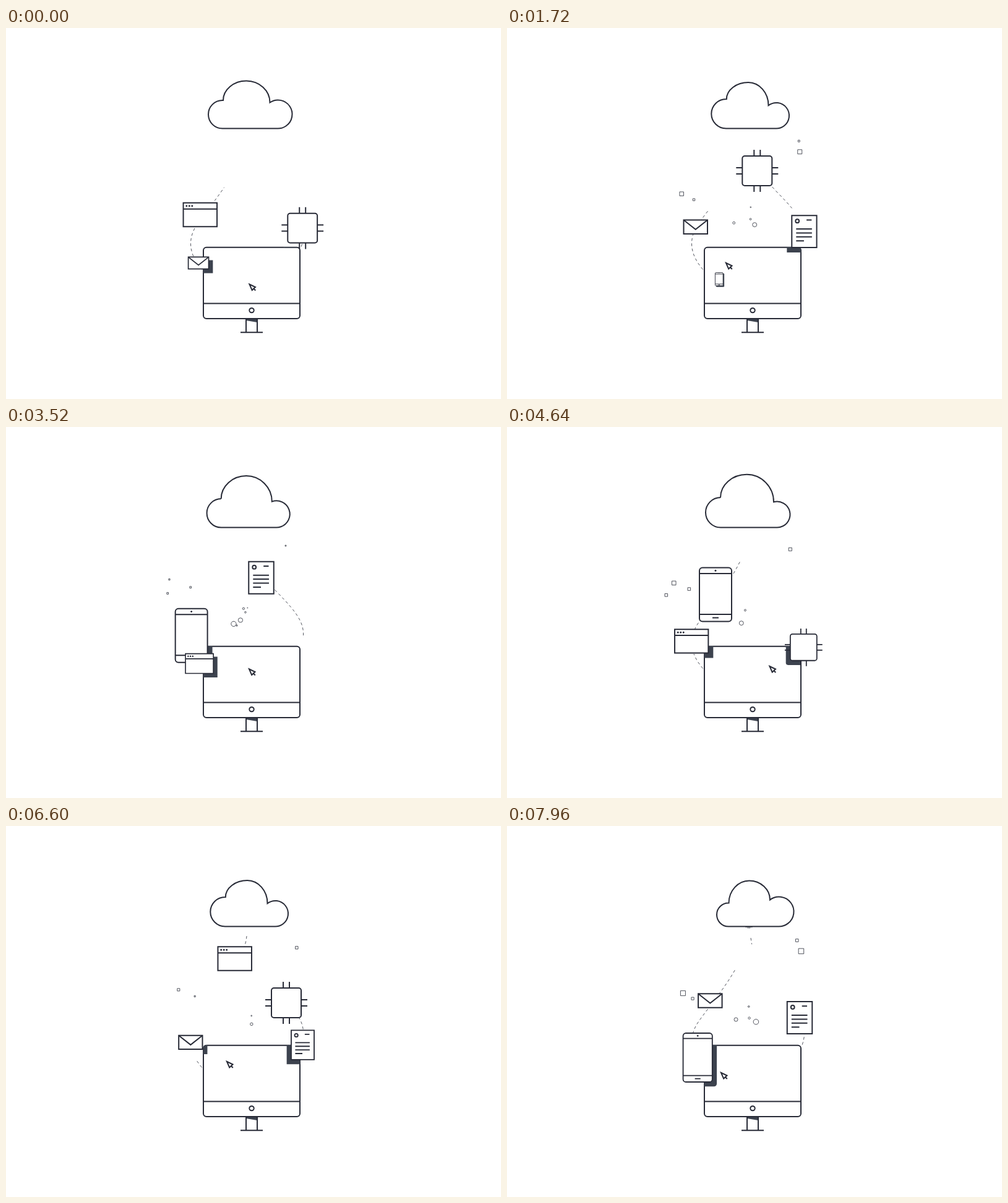
An HTML page with a canvas that plays this animation: 800 px wide and 600 px high, repeating every 8 s.

```html
<!DOCTYPE html>
<html lang="en">
<head>
<meta charset="utf-8">
<title>Cloud upload</title>
<style>
html, body { margin: 0; width: 100%; height: 100%; overflow: hidden; background: #fff; }
canvas { display: block; width: 800px; height: 600px; }
</style>
</head>
<body>
<canvas id="stage"></canvas>
<script>
const LOOP = 8000, CYCLE = 5640;
const INK = '#282b37', SHADE = '#3c424e';
const canvas = document.getElementById('stage');
const ctx = canvas.getContext('2d');
const ratio = window.devicePixelRatio || 1;
canvas.width = 800 * ratio;
canvas.height = 600 * ratio;

const clamp = (v, low = 0, high = 1) => Math.min(high, Math.max(low, v));
const mix = (a, b, u) => a + (b - a) * u;
const progress = (t, from, to) => clamp((t - from) / (to - from));
const smooth = u => u * u * (3 - 2 * u);

// Monotone cubic through [time, x, y] points
function route(points) {
  const last = points.length - 1;
  const slope = (i, c) => (points[i + 1][c] - points[i][c]) / (points[i + 1][0] - points[i][0]);
  const tangent = (i, c) => {
    if (i === 0) return slope(0, c);
    if (i === last) return slope(last - 1, c);
    const a = slope(i - 1, c), b = slope(i, c);
    return a * b <= 0 ? 0 : 2 * a * b / (a + b);
  };
  return time => {
    let i = 0;
    while (i < last - 1 && time > points[i + 1][0]) i++;
    const h = points[i + 1][0] - points[i][0], u = (time - points[i][0]) / h, v = 1 - u;
    return [1, 2].map(c => mix(points[i][c], points[i + 1][c], smooth(u))
      + h * u * v * (v * tangent(i, c) - u * tangent(i + 1, c)));
  };
}

function shape(build, fill = '#fff', line = 2) {
  ctx.beginPath();
  build();
  if (fill) { ctx.fillStyle = fill; ctx.fill(); }
  if (line) { ctx.lineWidth = line; ctx.strokeStyle = INK; ctx.stroke(); }
}
const box = (w, h, r) => ctx.roundRect(-w / 2, -h / 2, w, h, r);
const segment = (x1, y1, x2, y2) => { ctx.moveTo(x1, y1); ctx.lineTo(x2, y2); };
const ring = (x, y, r) => { ctx.moveTo(x + r, y); ctx.arc(x, y, r, 0, 7); };

// Every item on a lane follows the same route; head and tail trim its dashed track
const left = {
  side: 1, life: 3850,
  at: route([[0, 351, 411], [340, 319, 391], [680, 308.2, 374.5], [1600, 298.2, 347], [2350, 306, 318],
    [2650, 315, 300], [3000, 337, 271], [3580, 369.7, 214.5], [3760, 387, 170], [3850, 389, 148]]),
  track: new Path2D('M389 178C384 230 319 299 306 322S297 368 317 391'),
  head: age => mix(391, 178, progress(age, 1400, 3350)),
  tail: age => mix(391, 178, progress(age, 2620, 3900))
};
const right = {
  side: -1, life: 4060,
  at: route([[0, 430, 400], [200, 463, 375], [640, 479.3, 356.3], [1400, 480.5, 331], [2060, 473, 310],
    [2600, 453, 286], [3260, 412.5, 243.7], [3360, 404.3, 231], [3960, 391, 157], [4060, 391, 145]]),
  track: new Path2D('M394 181C397 200 400 228 437 266S489 323 476 357'),
  head: (age, y) => Math.max(y, 180),
  tail: age => mix(357, 180, Math.sqrt(progress(age, 3250, 4060)))
};

function phone(line) {
  shape(() => { segment(-26, -34, 26, -34); segment(-26, 32, 26, 32); segment(-5, 37.5, 5, 37.5); }, null, line);
  shape(() => ring(0, -38.7, 1.5), INK, 0);
}
function browser(line) {
  shape(() => segment(-27, -9.3, 27, -9.3), null, line);
  shape(() => [-22, -17.5, -13].forEach(x => ring(x, -14.2, 1.5)), INK, 0);
}
function mail(line) {
  shape(() => { segment(-19, -11, 0, 4); ctx.lineTo(19, -11); }, null, line);
}
function chip(line) {
  shape(() => [-5, 5].forEach(p => [-1, 1].forEach(s => {
    segment(p, 24 * s, p, 34 * s);
    segment(24 * s, p, 34 * s, p);
  })), null, line);
}
function sheet(line) {
  shape(() => {
    ring(-11.3, -17, 2.9);
    segment(3.7, -18.8, 12, -18.8);
    for (let i = 0; i < 4; i++) segment(-13.2, -4 + 6.4 * i, i < 3 ? 12.5 : -.5, -4 + 6.4 * i);
  }, null, line);
}

const items = [
  { lane: left, start: 1640, size: [52, 87, 5], detail: phone },
  { lane: left, start: 3020, size: [54.5, 38.5, 0], detail: browser },
  { lane: left, start: 5090, size: [38.5, 22.5, 0], detail: mail },
  { lane: right, start: 4000, size: [48, 48, 4], detail: chip },
  { lane: right, start: 260, size: [40.5, 52, 0], detail: sheet }
];

// Grow out of the screen, shrink into the cloud
const scaleAt = (age, y) => Math.max(.01, Math.min(1 - Math.exp(-age / 285), (y - 140) / 65));

// Cloud poses: top x, y, left edge, left notch x, y, right notch x, right edge, right radius
const rest = [388.5, 85.5, 327, 351, 117, 426.5, 462.5, 23];
const calm = [390, 88, 330.3, 354.8, 115, 422.5, 456, 20.8];
const lean = [391.5, 88.5, 339, 358.5, 124.5, 425, 463.5, 24];
const swell = [387.5, 76.8, 321, 345, 114, 431, 457.5, 21];
const cloudSteps = [[0, rest], [960, calm], [1720, calm], [2320, lean], [4000, swell], [4640, swell], [5400, rest], [CYCLE, rest]];

const parked = [393.5, 414.5];
const cursorSteps = [[0, parked], [960, [357, 381]], [1720, [354, 380]], [2320, [346, 399]],
  [3520, [393, 391.5]], [4640, [424.5, 387]], [5400, parked], [CYCLE, parked]];

function pose(steps, time) {
  const i = steps.findIndex(([t]) => t > time);
  const [t0, from] = steps[i - 1], [t1, to] = steps[i];
  const u = smooth(progress(time, t0, t1));
  return from.map((v, c) => mix(v, to[c], u));
}

// Each particle is its last x, y and size
const bursts = [
  { from: 300, to: 2500, squares: [[285, 271, 8.4], [299.5, 279.5, 4.4], [476, 203, 9]],
    bubbles: [[403, 316.3, 9], [391, 311, 3.6]] },
  { from: 1200, to: 3000, squares: [[466, 187, 6]], bubbles: [[373, 311, 8], [388, 294, 3.5]] },
  { from: 2500, to: 3900, squares: [], bubbles: [[370, 317, 10], [381, 311, 8.8], [382, 295, 4], [385, 301, 3.2]] },
  { from: 2700, to: 5100, squares: [[256, 272.8, 5.2], [293, 263, 5.2]], bubbles: [] },
  { from: 3300, to: 5560, squares: [[273, 255.6, 8.9], [461, 201, 7]], bubbles: [[382, 315, 9.4], [382, 298.5, 4]] }
];

// Big particles drift right, small ones left
function drawParticles(kind, phase, bigDrop, outline) {
  for (const burst of bursts) {
    if (phase <= burst.from || phase >= burst.to) continue;
    const e = progress(phase, burst.from, burst.to) ** .6;
    const pop = Math.min(1, (burst.to - phase) / 100);
    for (const [x, y, size] of burst[kind]) {
      const big = size > 6;
      const dx = big ? 12 : -11, dy = big ? bigDrop : 8;
      shape(() => outline(x - dx * (1 - e), y - dy * (1 - e), size * e * pop), null, .8);
    }
  }
}

function drawTrail({ item, age, y }) {
  const { head, tail, track } = item.lane;
  const top = head(age, y), bottom = tail(age);
  if (bottom <= top) return;
  ctx.save();
  ctx.beginPath();
  ctx.rect(250, top, 260, bottom - top);
  ctx.clip();
  ctx.setLineDash([4.5, 4]);
  ctx.lineWidth = .8;
  ctx.strokeStyle = INK;
  ctx.stroke(track);
  ctx.restore();
}

function drawShadow({ item, x, y, scale }) {
  const [w, h, r] = item.size;
  ctx.save();
  ctx.beginPath();
  ctx.roundRect(318.5, 354, 157, 116, 5);
  ctx.clip();
  ctx.translate(x + 7 * scale * item.lane.side, y + 7 * scale);
  ctx.scale(scale, scale);
  shape(() => box(w + 2, h + 2, r), SHADE, 0);
  ctx.restore();
}

function drawItem({ item, x, y, scale }) {
  const line = Math.max(2, .9 / scale);
  ctx.save();
  ctx.translate(x, y);
  ctx.scale(scale, scale);
  shape(() => box(...item.size), '#fff', line);
  item.detail(line);
  ctx.restore();
}

function drawMonitor() {
  shape(() => ctx.rect(388, 470, 18, 22), '#fff', 0);
  shape(() => { segment(388, 470, 406, 470); ctx.lineTo(406, 476); ctx.lineTo(388, 473); }, SHADE, 0);
  shape(() => {
    segment(388, 470, 388, 492); segment(406, 470, 406, 492); segment(379, 492.3, 415, 492.3);
  }, null);
  shape(() => ctx.roundRect(319, 354.7, 156, 115.3, 5));
  shape(() => { segment(319, 445.5, 475, 445.5); ring(397, 456.6, 3.7); }, null);
}

function drawCursor(phase) {
  ctx.save();
  ctx.translate(...pose(cursorSteps, phase));
  shape(() => { segment(0, 0, 9.5, 4.6); ctx.lineTo(4.2, 9.6); ctx.closePath(); });
  shape(() => segment(6.5, 6.8, 9.8, 10), null);
  ctx.restore();
}

function drawCloud(phase) {
  const [tx, ty, edge, ax, ay, bx, far, r] = pose(cloudSteps, phase);
  const base = 162.5, lr = (base - ay) / 2, cx = far - r, cy = base - r;
  const by = cy - Math.sqrt(Math.max(0, r * r - (cx - bx) ** 2));
  const k = .55;
  shape(() => {
    ctx.arc(edge + lr, base - lr, lr, Math.PI / 2, Math.PI * 1.5);
    ctx.lineTo(ax, ay);
    ctx.bezierCurveTo(ax, mix(ay, ty, k), mix(tx, ax, k), ty, tx, ty);
    ctx.bezierCurveTo(mix(tx, bx, k), ty, bx, mix(by, ty, k), bx, by);
    ctx.arc(cx, cy, r, Math.atan2(by - cy, bx - cx), Math.PI / 2);
    ctx.closePath();
  });
}

function draw(now) {
  const phase = now % LOOP % CYCLE;
  ctx.setTransform(ratio, 0, 0, ratio, 0, 0);
  ctx.fillStyle = '#fff';
  ctx.fillRect(0, 0, 800, 600);

  const active = [];
  for (const item of items) {
    const age = (phase - item.start + CYCLE) % CYCLE;
    if (age > item.lane.life) continue;
    const [x, y] = item.lane.at(age);
    active.push({ item, age, x, y, scale: scaleAt(age, y) });
  }
  active.sort((a, b) => a.y - b.y);

  active.forEach(drawTrail);
  drawParticles('squares', phase, 12, (x, y, d) => ctx.rect(x - d / 2, y - d / 2, d, d));
  drawParticles('bubbles', phase, -8, (x, y, d) => ring(x, y, d / 2));
  drawMonitor();
  active.forEach(drawShadow);
  active.forEach(drawItem);
  drawCursor(phase);
  drawCloud(phase);
}

let origin;
function tick(now) {
  origin ??= now;
  draw(now - origin);
  requestAnimationFrame(tick);
}
requestAnimationFrame(tick);
</script>
</body>
</html>
```
